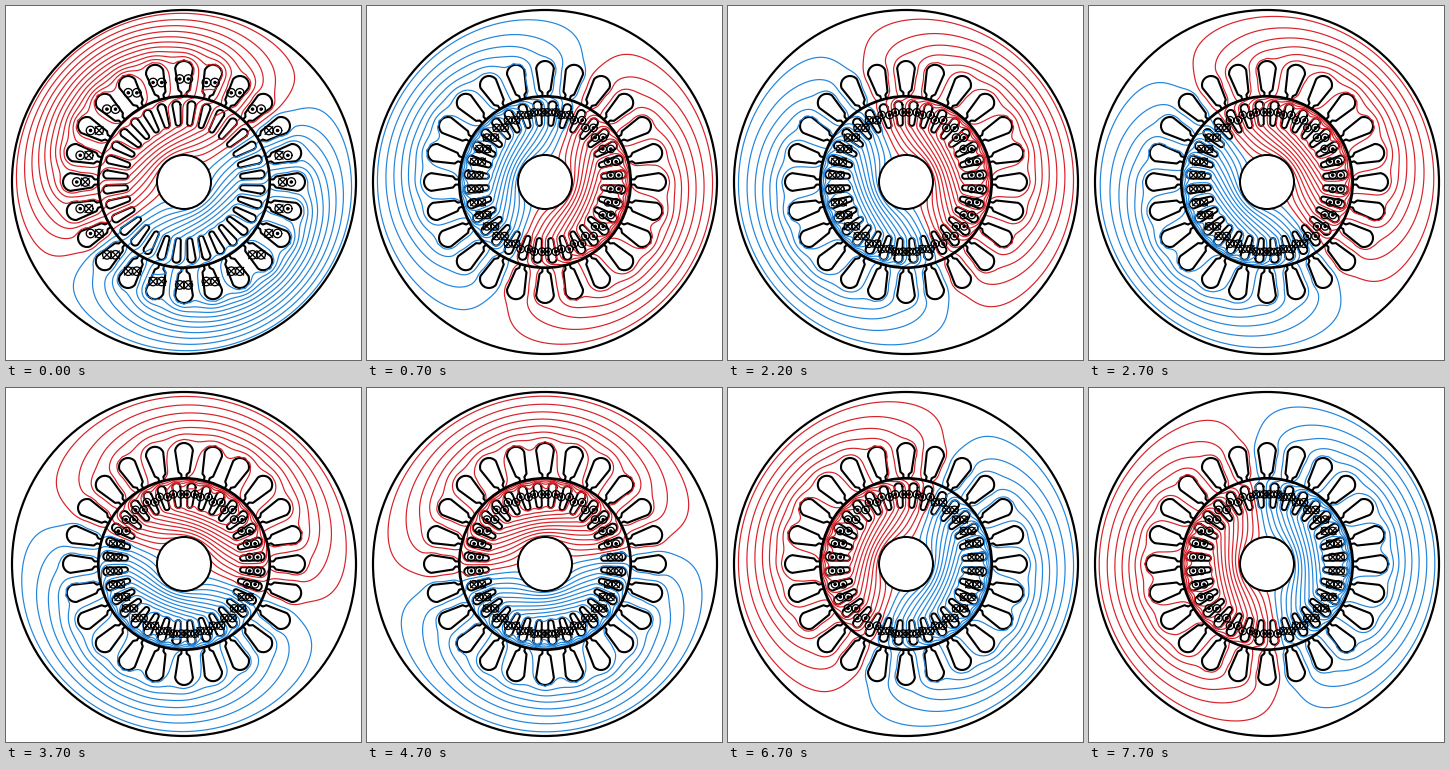
These frames come from a looping animation (355x354 px, 8000 ms). A matplotlib script:

```python
import numpy as np
import matplotlib.pyplot as plt
from matplotlib.animation import FuncAnimation
from matplotlib.collections import LineCollection
from matplotlib.path import Path

W, H, DPI = 355, 354, 100
PX = 72 / DPI
CX, CY = 178, 176
R_SHAFT, R_GAP, R_OUT = 27, 85.7, 172
N_SLOTS, N_BARS = 24, 32
RED, BLUE = "#d9232a", "#2386dc"
TICK, LOOP = 100, 8000


# Outlines in slot coordinates: p along the radius, q across it
def arc(p, radius, start, stop):
    a = np.radians(np.linspace(start, stop, 17))
    return np.column_stack([p + radius * np.cos(a), radius * np.sin(a)])


SLOT = np.vstack([[(86, -2.6), (89.5, -2.6), (92, -5.5)],
                  arc(112, 9, -80, 80),
                  [(92, 5.5), (89.5, 2.6), (86, 2.6)]])
BAR = np.vstack([arc(77, 4.1, -86, 86), arc(59, 2.6, 86, 274)])
BAR = np.vstack([BAR, BAR[:1]])

slot_angles = 2 * np.pi * np.arange(N_SLOTS) / N_SLOTS
bar_angles = 2 * np.pi * (np.arange(N_BARS) + 0.5) / N_BARS


# Magnetic vector potential on a log-polar grid, zero at the rim
NT, NU = 384, 113
ht = 2 * np.pi / NT
hu = np.log(R_OUT / R_SHAFT) / NU
MU_IRON, MU_SHAFT = 120, 40


def grid(rows, cols):
    r = R_SHAFT * np.exp(np.asarray(rows) * hu)
    return np.meshgrid(r, np.asarray(cols) * ht, indexing="ij")


def inside(outline, r, theta, angles):
    """Mask of points in any slot, and the angle of the nearest slot."""
    pitch = 2 * np.pi / len(angles)
    centre = angles[0] + pitch * np.round((theta - angles[0]) / pitch)
    d = theta - centre
    pts = np.column_stack([(r * np.cos(d)).ravel(), (r * np.sin(d)).ravel()])
    return Path(outline).contains_points(pts).reshape(r.shape), centre


def reluctivity(r, theta):
    nu = np.full(r.shape, 1 / MU_IRON)
    nu[abs(r - R_GAP) < 0.8] = 1
    nu[inside(SLOT, r, theta, slot_angles)[0]] = 1
    nu[inside(BAR, r, theta, bar_angles)[0]] = 1
    return nu


rows, cols = np.arange(1, NU), np.arange(NT)
gu = reluctivity(*grid(np.arange(NU) + 0.5, cols)) / hu**2
gt = reluctivity(*grid(rows, cols + 0.5)) / ht**2
gu[0] = 1 / MU_SHAFT / hu  # a solid shaft seen by a two-pole field


def stiffness(a):
    fu = gu * np.diff(np.pad(a, ((0, 0), (1, 1), (0, 0))), axis=1)
    ft = gt * (np.roll(a, -1, axis=2) - a)
    return np.roll(ft, 1, axis=2) - ft - np.diff(fu, axis=1)


def harmonic_inverses():
    a, b = gu.mean(axis=1), gt.mean(axis=1)
    radial = np.diag(a[:-1] + a[1:]) - np.diag(a[1:-1], 1) - np.diag(a[1:-1], -1)
    k = np.arange(NT // 2 + 1)
    twist = 2 - 2 * np.cos(k * ht)
    return np.linalg.inv(radial + twist[:, None, None] * np.diag(b))


inverses = harmonic_inverses()


def precondition(res):
    f = np.ascontiguousarray(np.fft.rfft(res, axis=2).transpose(2, 1, 0))
    g = np.matmul(inverses, f.view(float)).view(complex)
    return np.fft.irfft(g.transpose(2, 1, 0), n=NT, axis=2)


def solve(rhs, max_iter=160):
    """Preconditioned conjugate gradients."""
    x = np.zeros_like(rhs)
    res = rhs.copy()
    z = precondition(res)
    d, rz = z, np.sum(res * z)
    goal = rz * 1e-8
    for _ in range(max_iter):
        q = stiffness(d)
        alpha = rz / np.sum(d * q)
        x += alpha * d
        res -= alpha * q
        z = precondition(res)
        rz, old = np.sum(res * z), rz
        if rz < goal:
            break
        d = z + rz / old * d
    return x


def potential(outline, angles, r_min):
    """Cosine and sine parts of the field of a sinusoidal current sheet."""
    r, theta = grid(rows, cols)
    mask, centre = inside(outline, r, theta, angles)
    load = (mask & (r > r_min)) * r**2
    a = solve(np.stack([load * np.cos(centre), load * np.sin(centre)]))
    a = np.concatenate([a[:, :1], a, np.zeros_like(a[:, :1])], axis=1)
    return np.concatenate([a, a[:, :, :1]], axis=2)


# Drawing
fig = plt.figure(figsize=(W / 100, H / 100), dpi=DPI, facecolor="white")
ax = fig.add_axes([0, 0, 1, 1])
ax.axis("off")


def place(outline, angle):
    p, q = outline.T
    c, s = np.cos(angle), np.sin(angle)
    return np.column_stack([CX + p * c - q * s, CY - p * s - q * c])


def strokes(lines, width, z):
    return ax.add_collection(LineCollection(
        lines, colors="black", linewidths=width * PX, zorder=z,
        capstyle="round", joinstyle="round"))


def circle_at(x, y, radius):
    return arc(0, radius, 0, 360) + (x, y)


def symbol(x, y, radius, out):
    """Ring with a dot for current out of the page, a cross for current in."""
    ring = circle_at(x, y, radius)
    if out:
        return [ring, circle_at(x, y, 1.1), circle_at(x, y, 0.4)]
    k = radius * 0.9
    return [ring, [(x - k, y - k), (x + k, y + k)],
            [(x - k, y + k), (x + k, y - k)]]


def pair(angle, r, gap, radius, out_left, out_right):
    x, y = CX + r * np.cos(angle), CY - r * np.sin(angle)
    return (symbol(x - gap, y, radius, out_left)
            + symbol(x + gap, y, radius, out_right))


def stator_symbols():
    lines = []
    for a in slot_angles:
        outer, inner = np.sin(a) > -0.6, np.sin(a) > 0.6
        sides = (inner, outer) if np.cos(a) > 0 else (outer, inner)
        lines += pair(a, 103, 4.3, 4.3, *sides)
    return strokes(lines, 1.3, 4)


def rotor_symbols(phi):
    lines = []
    for a in bar_angles:
        out = np.cos(a - phi) > 0
        lines += pair(a, 70, 4, 3.8, out, out)
    return strokes(lines, 1.3, 4)


R, T = grid(np.arange(NU + 1), np.arange(NT + 1))
X, Y = CX + R * np.cos(T), CY - R * np.sin(T)


def flux(field, phi, count):
    a = np.cos(phi) * field[0] + np.sin(phi) * field[1]
    levels = (np.arange(count) + 0.5) / count * np.hypot(*field).max()
    return [ax.contour(X, Y, sign * a, levels=levels, colors=[color],
                       linewidths=1.2 * PX, zorder=3)
            for sign, color in ((1, RED), (-1, BLUE))]


for radius, width in ((R_SHAFT, 2), (R_GAP, 2.7), (R_OUT, 2.2)):
    ax.add_patch(plt.Circle((CX, CY), radius, fill=False, ec="black",
                            lw=width * PX, zorder=3.5))
strokes([place(SLOT, a) for a in slot_angles], 2.1, 2)
strokes([place(BAR, a) for a in bar_angles], 2, 2)

stator_field = potential(SLOT, slot_angles, 92)
rotor_field = potential(BAR, bar_angles, 0)

# The stator-fed field comes first, then the rotor field in steps of 15 degrees
scenes = [flux(stator_field, np.radians(126), 12) + [stator_symbols()]]
for step in range(1, 17):
    phi = np.radians(8.5 + 15 * (step - 4))
    scenes.append(flux(rotor_field, phi, 12) + [rotor_symbols(phi)])

ax.set_xlim(0, W)
ax.set_ylim(H, 0)


def update(frame):
    current = (frame * TICK + 300) // 500
    for i, scene in enumerate(scenes):
        for artist in scene:
            artist.set_visible(i == current)
    return scenes[current]


anim = FuncAnimation(fig, update, frames=LOOP // TICK, interval=TICK,
                     repeat=True, repeat_delay=0, blit=False)
plt.show()
```
